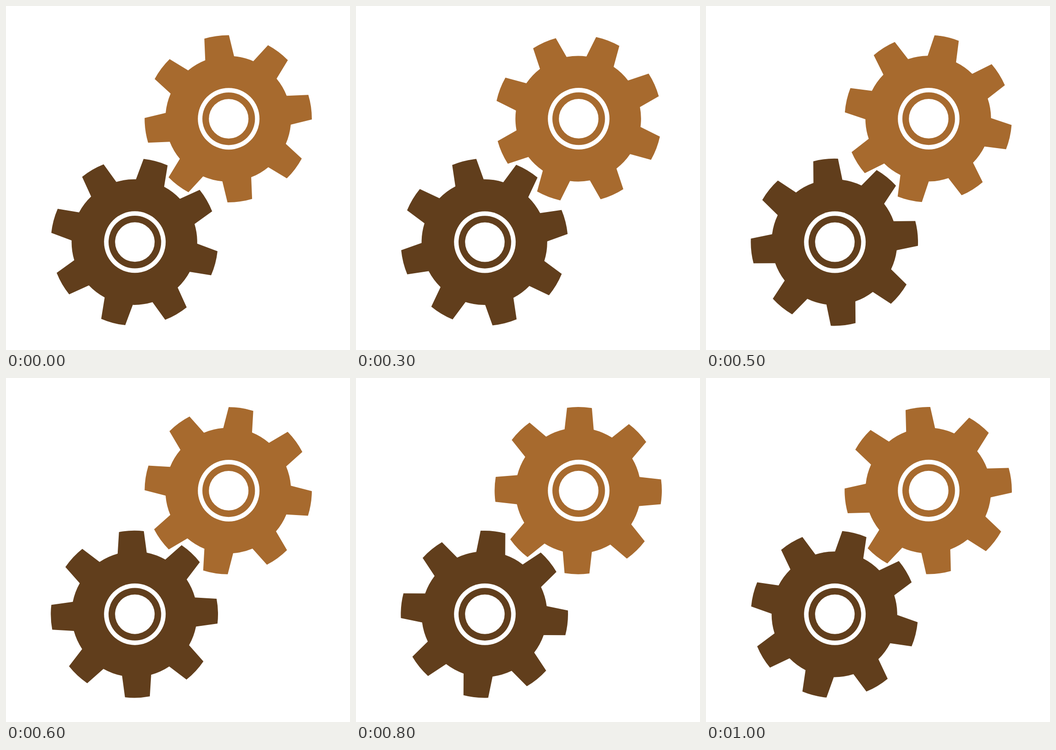
Write an HTML page that moves like this. It is 748 by 748 pixels and loops after 1100 ms.

```html
<!DOCTYPE html>
<html lang="en">
<head>
<meta charset="utf-8">
<title>Gears</title>
<style>
  html, body { margin: 0; width: 100%; height: 100%; overflow: hidden; background: #fff; }
  svg { display: block; width: 748px; height: 748px; }
</style>
</head>
<body>
<svg viewBox="0 0 748 748"></svg>
<script>
const svg = document.querySelector('svg');
const TEETH = 8, ROOT = 136.6, TIP = 181.8;
const ROOT_HALF = 13.4, TIP_HALF = 8.55; // half tooth widths in degrees
const STEP_MS = 100, STEPS = 11, STEP_DEG = 4.01;

function add(tag, attrs) {
  const el = document.createElementNS('http://www.w3.org/2000/svg', tag);
  for (const key in attrs) el.setAttribute(key, attrs[key]);
  svg.append(el);
  return el;
}

// Angles run clockwise from straight up.
function point(r, deg) {
  const a = deg * Math.PI / 180;
  return `${(r * Math.sin(a)).toFixed(2)} ${(-r * Math.cos(a)).toFixed(2)}`;
}

function gearPath() {
  let d = '';
  for (let i = 0; i < TEETH; i++) {
    const a = i * 360 / TEETH;
    d += i ? `A${ROOT} ${ROOT} 0 0 1 ` : 'M';
    d += `${point(ROOT, a - ROOT_HALF)}L${point(TIP, a - TIP_HALF)}`;
    d += `A${TIP} ${TIP} 0 0 1 ${point(TIP, a + TIP_HALF)}L${point(ROOT, a + ROOT_HALF)}`;
  }
  return d + `A${ROOT} ${ROOT} 0 0 1 ${point(ROOT, -ROOT_HALF)}Z`;
}

function makeGear(x, y, fill, phase, dir, drift) {
  const body = add('path', { d: gearPath(), fill });
  const rings = [[67, '#fff'], [57.2, fill], [43, '#fff']].map(([r, color]) =>
    add('circle', { cx: x + 1, r, fill: color }));
  return step => {
    const cy = y + drift * step / STEPS;
    const turn = step ? (step + 1) * STEP_DEG : 0;
    body.setAttribute('transform', `translate(${x} ${cy}) rotate(${phase + dir * turn})`);
    for (const ring of rings) ring.setAttribute('cy', cy);
  };
}

const gears = [
  makeGear(483.2, 245.2, '#a76a2e', -8.05, -1, -0.5),
  makeGear(279.2, 513.3, '#613e1c', 14.85, 1, 0.6)
];

function draw() {
  const step = Math.floor(performance.now() / STEP_MS) % STEPS;
  for (const gear of gears) gear(step);
  requestAnimationFrame(draw);
}
draw();
</script>
</body>
</html>
```
